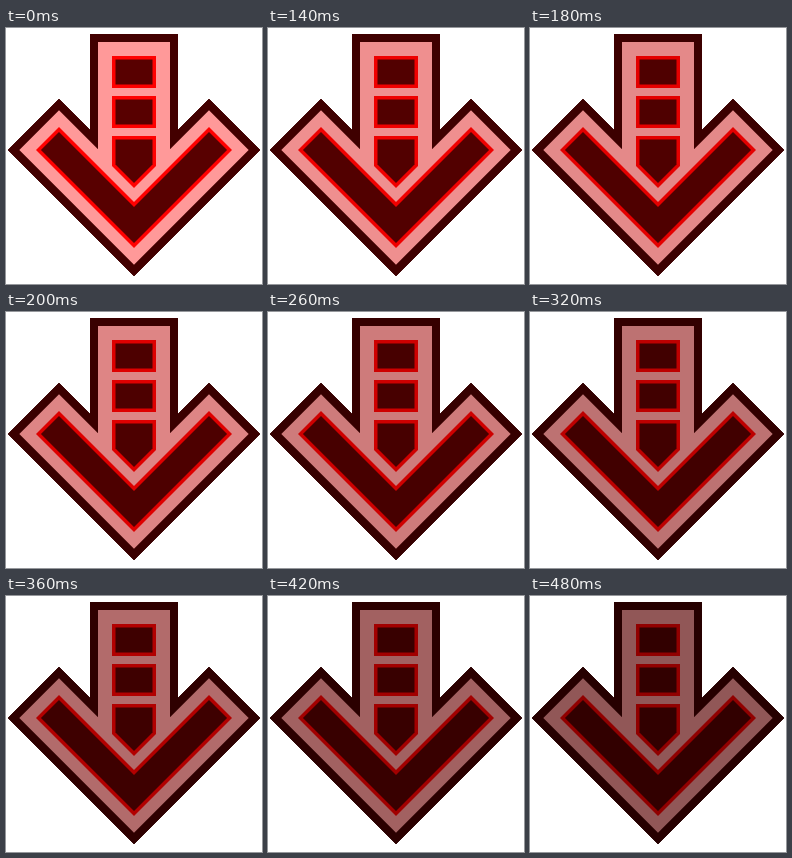
An HTML page with a canvas that plays this animation: 256x256 px, repeating every 880 ms.

```html
<!DOCTYPE html>
<html>
<head>
<meta charset="utf-8">
<style>
  html, body { margin: 0; width: 100%; height: 100%; overflow: hidden; background: #fff; }
  canvas { display: block; width: 256px; height: 256px; }
</style>
</head>
<body>
<canvas id="stage" width="256" height="256"></canvas>
<script>
const ctx = document.getElementById('stage').getContext('2d');
const LOOP = 880, FADE_START = 80, FADE_END = 480, FADE_DEPTH = 0.43;
const STEPS = [140, 180, 200, 260, 320, 340, 360, 420, 480];

const CX = 128, ARM_Y = 122;   // centre line and height of the side tips
const ARM_X = 75;              // distance of the arm tops from the centre line
const BORDER = 8, LINE = 3.5;

// Each outline is the right half, top to bottom, shrunk evenly by `inset`.
// All slanted edges run at 45 degrees, so their corners move by inset * sqrt(2).
function chevron(inset, reach, shaft) {
  const tip = reach - inset * Math.SQRT2;
  const armTop = ARM_Y - (tip - ARM_X);
  const notch = x => armTop + ARM_X - x;
  const start = shaft
    ? [[0, shaft.top + inset], [shaft.half - inset, shaft.top + inset],
       [shaft.half - inset, notch(shaft.half - inset)]]
    : [[0, notch(0)]];
  return [...start, [ARM_X, armTop], [tip, ARM_Y], [0, ARM_Y + tip]];
}

const arrow = inset => chevron(inset, 126, { top: 6, half: 44 });
const innerChevron = inset => chevron(inset, 98);

function block(index, inset) {
  const top = 28 + 40 * index, half = 22 - inset;
  const pointed = index === 2;
  const end = pointed ? 160 - inset * Math.SQRT2 : top + 32 - inset;
  return [[0, top + inset], [half, top + inset], [half, pointed ? end - half : end], [0, end]];
}

function fill(half, color) {
  const mirrored = half.slice(1, -1).reverse().map(([x, y]) => [-x, y]);
  ctx.beginPath();
  for (const [x, y] of [...half, ...mirrored]) ctx.lineTo(CX + x, y);
  ctx.closePath();
  ctx.fillStyle = color;
  ctx.fill();
}

function brightness(time) {
  const step = STEPS.filter(t => t <= time).pop();
  if (step === undefined) return 1;
  return 1 - FADE_DEPTH * (step - FADE_START) / (FADE_END - FADE_START);
}

function draw(level) {
  const shade = (...rgb) => `rgb(${rgb.map(c => Math.round(c * level))})`;
  const outlined = outline => {
    fill(outline(0), shade(255, 0, 0));
    fill(outline(LINE), shade(88, 0, 0));
  };
  ctx.clearRect(0, 0, 256, 256);
  // Repeated fills give the silhouette a crisp edge.
  for (let i = 0; i < 4; i++) fill(arrow(0), shade(67, 0, 0));
  fill(arrow(BORDER), shade(255, 153, 153));
  outlined(innerChevron);
  for (let i = 0; i < 3; i++) outlined(inset => block(i, inset));
}

const start = performance.now();
function frame() {
  draw(brightness((performance.now() - start) % LOOP));
  requestAnimationFrame(frame);
}
frame();
</script>
</body>
</html>
```
